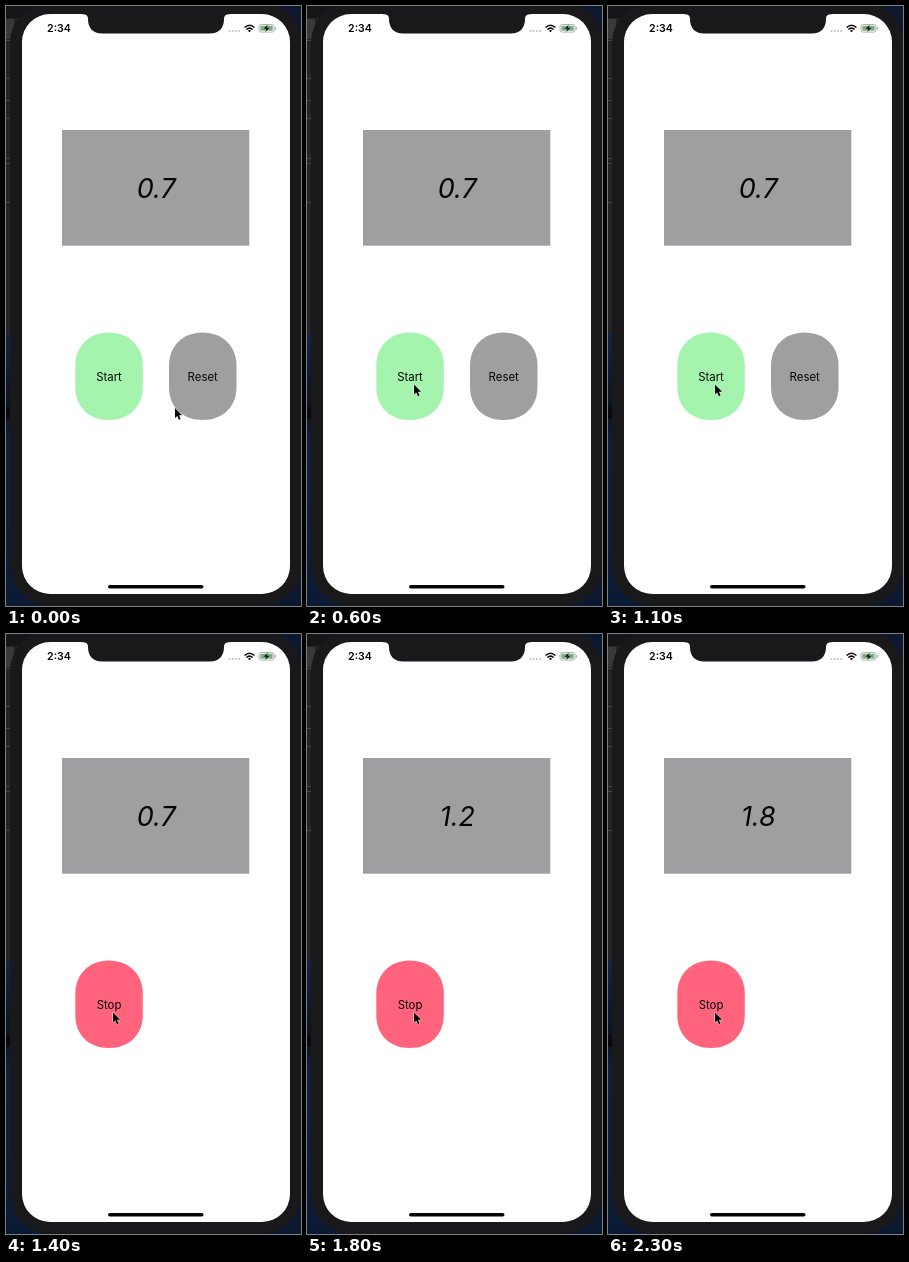
These frames come from a looping animation (295x600 px, 2.4 s). An HTML page:

```html
<!DOCTYPE html>
<html lang="en">
<head>
<meta charset="utf-8">
<title>Stopwatch</title>
<style>
  html, body { margin: 0; width: 100%; height: 100%; overflow: hidden; background: #151517; }
  svg { display: block; width: 295px; height: 600px; }
  text { font-family: Inter, Roboto, sans-serif; text-anchor: middle; fill: #050505; }
  .label { font-size: 11.4px; }
  .time { font-size: 27px; font-style: italic; }
  .clock { font-size: 10.6px; font-weight: 600; }
</style>
</head>
<body>
<svg viewBox="0 0 295 600">
  <defs>
    <linearGradient id="sea" x1="0" y1="0" x2="0" y2="1">
      <stop offset="0" stop-color="#132443"/>
      <stop offset=".28" stop-color="#0b1220"/>
      <stop offset=".4" stop-color="#10203c"/>
      <stop offset="1" stop-color="#0b1a34"/>
    </linearGradient>
    <path id="pill" d="M33.5 0C54 0 67.500 14 67.500 33V54.500C67.500 74 54 87.500 33.500 87.500S0 74 0 54.500V33C0 14 13.500 0 33.500 0Z"/>
  </defs>

  <!-- desktop behind the phone -->
  <rect width="295" height="600" fill="#0b1830"/>
  <rect width="60" height="327" fill="#242426"/>
  <rect width="60" height="12" fill="#151517"/>
  <rect y="13" width="8" height="20" fill="#39393b"/>
  <path d="M0 34.500H5M0 72.500H5M0 94.500H5M0 112.500H5M0 152.500H5M0 157.500H5M0 196.500H5" stroke="#454547"/>
  <rect y="327" width="60" height="273" fill="url(#sea)"/>
  <path d="M0 400L4 402V412L0 413Z" fill="#07090d"/>

  <!-- phone -->
  <rect x="4" y="-4" width="292" height="604" rx="41" fill="#19191b"/>
  <rect x="16" y="8" width="268" height="580" rx="28" fill="#fff"/>
  <path d="M76 7V8.300C80 8.300 82 9.500 82 13C82 22 87 27.500 96 27.500H204C213 27.500 218 22 218 13C218 9.500 220 8.300 224 8.300V7Z" fill="#19191b"/>

  <!-- status bar -->
  <text class="clock" x="53" y="26.400">2:34</text>
  <g fill="#c4c4c6">
    <circle cx="223.500" cy="25" r="1.100"/><circle cx="226.700" cy="25" r="1.100"/>
    <circle cx="229.900" cy="25" r="1.100"/><circle cx="233.100" cy="25" r="1.100"/>
  </g>
  <g fill="none" stroke="#0a0a0a" stroke-width="1.600">
    <path d="M238.600 21.500Q243.500 17 248.400 21.500M240.400 23.500Q243.500 20.700 246.600 23.500"/>
    <path d="M243.500 26.300L241.900 24.700Q243.500 23.500 245.100 24.700Z" fill="#0a0a0a" stroke="none"/>
  </g>
  <rect x="253" y="18.500" width="15" height="7.600" rx="2.200" fill="#fff" stroke="#98a39a" stroke-width=".8"/>
  <rect x="254.300" y="19.800" width="12.400" height="5" rx="1" fill="#7fac88"/>
  <path d="M269.300 21V23.800" stroke="#98a39a"/>
  <path d="M261.700 18.800L257.600 22.800H260.300L259.300 25.900L263.500 21.700H260.800Z" fill="#10180f"/>

  <!-- stopwatch -->
  <rect x="56" y="124" width="187.300" height="115.700" fill="#9f9fa1"/>
  <text class="time" id="time" x="150.300" y="191.500">0.7</text>
  <use href="#pill" id="main" x="69.300" y="326.500"/>
  <text class="label" id="action" x="103" y="374.500">Start</text>
  <g id="reset">
    <use href="#pill" x="163" y="326.500" fill="#9f9fa1"/>
    <text class="label" x="196.700" y="374.500">Reset</text>
  </g>
  <rect x="102" y="579" width="95.500" height="3.600" rx="1.800" fill="#050505"/>

  <path id="cursor" d="M0 0V10L2.300 7.900L3.900 11.700L5.600 11L4 7.300H7.100Z" fill="#050505" stroke="#fff" stroke-width=".8" stroke-linejoin="round" paint-order="stroke"/>
</svg>
<script>
const LOOP = 2400;
const PRESS = 1400;

// [start ms, x, y]
const moves = [
  [0, 169, 402], [100, 152, 390], [200, 132, 379.5],
  [300, 117, 377], [400, 110, 377.5], [500, 107, 378.5]
];
// [start ms, reading]
const readings = [
  [0, 0.7], [1600, 1], [1700, 1.1], [1800, 1.2], [1900, 1.3],
  [2000, 1.4], [2100, 1.6], [2200, 1.7], [2300, 1.8]
];

const el = id => document.getElementById(id);
const time = el('time'), main = el('main'), action = el('action');
const reset = el('reset'), cursor = el('cursor');
const stepAt = (steps, t) => steps.filter(s => s[0] <= t).pop();

function draw(t) {
  const running = t >= PRESS;
  const [, x, y] = stepAt(moves, t);
  time.textContent = stepAt(readings, t)[1].toFixed(1);
  main.setAttribute('fill', running ? '#ff647c' : '#a5f4ae');
  action.textContent = running ? 'Stop' : 'Start';
  reset.setAttribute('visibility', running ? 'hidden' : 'visible');
  cursor.setAttribute('transform', `translate(${x} ${y})`);
}

const start = performance.now();
function tick() {
  draw((performance.now() - start) % LOOP);
  requestAnimationFrame(tick);
}
draw(0);
requestAnimationFrame(tick);
</script>
</body>
</html>
```
